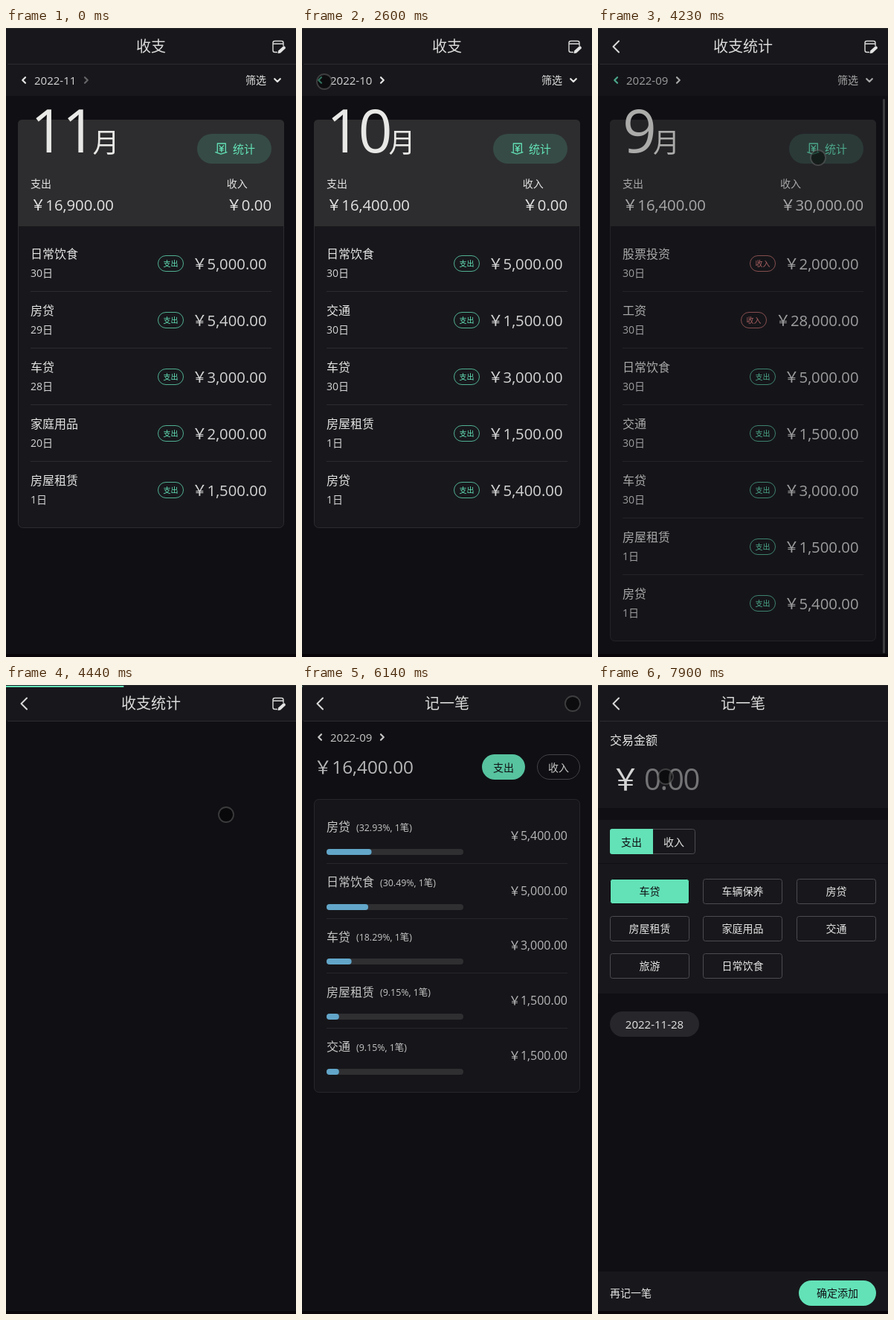
An HTML page that plays this animation: 390x844 px, repeating every 8 s.

```html
<!DOCTYPE html>
<html lang="zh-CN">
<head>
<meta charset="utf-8">
<title>收支</title>
<style>
html, body { margin: 0; width: 100%; height: 100%; overflow: hidden; background: #101014; }
svg { display: block; width: 390px; height: 844px; }
text { font-family: "Open Sans", "Noto Sans CJK SC", "Noto Sans CJK", sans-serif; white-space: pre; }
</style>
</head>
<body>
<svg id="stage" viewBox="0 0 390 844"></svg>
<script>
const LOOP = 8000;
const TEAL = '#63e2b7', RED = '#e88080', PANEL = '#18181c', LINE = '#2c2c30', EDGE = '#4c4c50';
const INK = '#e4e4e4', SOFT = '#d4d4d5', DARK = '#101014';

// Markup helpers; text is placed by the middle of its line.
const text = (x, cy, size, str, fill = INK, anchor = 'start', extra = '') =>
  `<text x="${x}" y="${cy + size * 0.37}" font-size="${size}" fill="${fill}" text-anchor="${anchor}" ${extra}>${str}</text>`;
const rect = (x, y, w, h, fill, r = 0, extra = '') =>
  `<rect x="${x}" y="${y}" width="${w}" height="${h}" rx="${r}" fill="${fill}" ${extra}/>`;
const box = (x, y, w, h, stroke, r, fill = 'none', extra = '') =>
  rect(x + 0.5, y + 0.5, w - 1, h - 1, fill, r, `stroke="${stroke}" ${extra}`);
const stroke = (d, color, width, extra = '') =>
  `<path d="${d}" fill="none" stroke="${color}" stroke-width="${width}" stroke-linecap="round" stroke-linejoin="round" ${extra}/>`;
const rule = (y, x1 = 33, x2 = 357) => rect(x1, y, x2 - x1, 1, LINE);
const group = (id, body) => `<g id="${id}">${body}</g>`;
const money = v => '￥' + v.toLocaleString('en-US', { minimumFractionDigits: 2, maximumFractionDigits: 2 });
const moneyWidth = (str, size) =>
  [...str].reduce((w, c) => w + (c === '￥' ? 1 : /\d/.test(c) ? 0.572 : 0.255), 0) * size;

const MONTHS = [
  { name: '11', out: 16900, inc: 0, rows: [
    ['日常饮食', 30, 5000], ['房贷', 29, 5400], ['车贷', 28, 3000], ['家庭用品', 20, 2000], ['房屋租赁', 1, 1500]] },
  { name: '10', out: 16400, inc: 0, rows: [
    ['日常饮食', 30, 5000], ['交通', 30, 1500], ['车贷', 30, 3000], ['房屋租赁', 1, 1500], ['房贷', 1, 5400]] },
  { name: '9', out: 16400, inc: 30000, rows: [
    ['股票投资', 30, 2000, 1], ['工资', 30, 28000, 1], ['日常饮食', 30, 5000], ['交通', 30, 1500],
    ['车贷', 30, 3000], ['房屋租赁', 1, 1500], ['房贷', 1, 5400]] }
];
const SPEND = [['房贷', 5400], ['日常饮食', 5000], ['车贷', 3000], ['房屋租赁', 1500], ['交通', 1500]];
const KINDS = ['车贷', '车辆保养', '房贷', '房屋租赁', '家庭用品', '交通', '旅游', '日常饮食'];

function listRow([name, day, sum, income], i, rows) {
  const y = 316 + i * 76, label = money(sum);
  const tagX = Math.round(339 - moneyWidth(label, 20.3)) - 35;
  const color = income ? RED : TEAL;
  return text(33, y - 13, 16, name) + text(33, y + 13, 14, day + '日', SOFT) +
    box(tagX, y - 11, 35, 22, color, 10.5, 'none', 'stroke-opacity=".75"') +
    text(tagX + 17.5, y, 10, income ? '收入' : '支出', color, 'middle') +
    text(350.5, y, 20.3, label, SOFT, 'end') +
    (i < rows.length - 1 ? rule(y + 37) : '');
}

function skeleton() {
  let s = '';
  for (let i = 0; i < 8; i++) s += rect(33, 278 + i * 40, i < 7 ? 324 : 194, i < 7 ? 32 : 30, '#353539', 3);
  return s;
}

const arrows = id =>
  stroke('M26 66.2L22.2 70L26 73.8', INK, 2.2, `id="${id}Prev"`) +
  stroke('M106 66.2L109.8 70L106 73.8', INK, 2.2, `id="${id}Next"`);

const ledgerPage = () =>
  rect(0, 49, 390, 42, PANEL) + arrows('nav') +
  group('navText', text(38, 70, 15, '', SOFT, 'start', 'id="date"') + text(322, 70, 14, '筛选') +
    stroke('M361.2 68.2L365 72L368.8 68.2', INK, 2.2)) +
  box(16, 123, 358, 548, LINE, 6, PANEL, 'id="card"') +
  `<path d="M16 266V129q0-6 6-6H368q6 0 6 6V266z" fill="#2d2d2f"/>` +
  `<text id="big" x="33" y="167" font-size="80" letter-spacing="-3" fill="#e8e8e6"></text>` +
  `<text id="unit" y="167" font-size="36" fill="#e8e8e6">月</text>` +
  rect(257, 142, 100, 40, TEAL, 20, 'fill-opacity=".16"') +
  stroke('M284.3 166V155h11v11M281.8 166.6L289 169.2L297 166.6M287 157.8l2.8 3.4l2.8-3.4M289.8 161.2v5M287.3 161.6h5M287.3 163.9h5', TEAL, 1.3) +
  text(305, 162, 15, '统计', TEAL) +
  text(33, 209, 14, '支出') + text(33, 237, 20.3, '', INK, 'start', 'id="out"') +
  text(297, 209, 14, '收入', INK, 'start', 'id="incLabel"') + text(357, 237, 20.3, '', INK, 'end', 'id="inc"') +
  group('skeleton', skeleton()) +
  MONTHS.map((m, i) => group('list' + i, m.rows.map(listRow).join(''))).join('');

function statsPage() {
  const total = SPEND.reduce((s, r) => s + r[1], 0);
  return arrows('stat') + text(38, 70, 15, '2022-09') +
    text(16, 110, 24.3, money(total), SOFT) +
    rect(242, 93, 58, 34, TEAL, 17) + text(271, 111, 14, '支出', DARK, 'middle') +
    box(316, 93, 58, 34, EDGE, 16.5) + text(345, 111, 14, '收入', INK, 'middle') +
    box(16, 153, 358, 394, LINE, 6, PANEL) +
    SPEND.map(([name, sum], i) => {
      const y = 190.5 + i * 73.7, part = sum / total;
      const bar = Math.round(y + 29.5);
      return text(33, y, 16, name) +
        text(41 + name.length * 16, y + 1, 12.4, `(${(part * 100).toFixed(2)}%, 1笔)`) +
        rect(33, bar, 184, 8, '#353538', 4) + rect(33, bar, 184 * part, 8, '#70c0e8', 4) +
        text(357, y + 11.5, 16, money(sum), SOFT, 'end') +
        (i < 4 ? rule(Math.round(y + 48.5)) : '');
    }).join('');
}

const recordPage = () =>
  rect(0, 49, 390, 116, PANEL) + rect(0, 181, 390, 58, PANEL) + rect(0, 240, 390, 174, PANEL) +
  rect(0, 787, 390, 53, PANEL) +
  text(16, 74, 16, '交易金额') + text(17, 126, 40, '￥', SOFT, 'start', 'font-weight="500"') +
  text(62, 126, 40, '0.00', '#747477', 'start', 'letter-spacing="-1.3"') +
  box(16, 193, 115, 34, EDGE, 3) +
  `<path d="M74 193V227H19q-3 0-3-3V196q0-3 3-3z" fill="${TEAL}"/>` +
  text(45, 211, 14, '支出', DARK, 'middle') + text(102, 211, 14, '收入', INK, 'middle') +
  KINDS.map((name, i) => {
    const x = Math.round(16 + i % 3 * 125.4), y = 260 + Math.floor(i / 3) * 50;
    return box(x, y, 107, 34, i ? EDGE : '#0c0c10', 3, i ? 'none' : TEAL) +
      text(x + 53.5, y + 17, 14, name, i ? INK : DARK, 'middle');
  }).join('') +
  rect(16, 438, 120, 34, '#27272b', 17) + text(76, 455, 15, '2022-11-28', INK, 'middle') +
  text(16, 816, 14, '再记一笔') +
  rect(270, 799, 104, 34, TEAL, 17) + text(322, 816, 14, '确定添加', DARK, 'middle');

const header = () =>
  rect(0, 0, 390, 48, PANEL) + rect(0, 0, 390, 1, '#28282b') + rect(2, 48, 388, 1, LINE) +
  text(195, 24.5, 20, '', '#dadada', 'middle', 'id="title"') +
  stroke('M28 17.5L20.5 25L28 32.5', '#dadada', 2, 'id="back"') +
  group('edit', stroke('M364.5 32.5H361.5q-2.5 0-2.5-2.5V20q0-2.5 2.5-2.5H370.5q2.5 0 2.5 2.5V23.5M359 21.2H373', '#dadada', 1.4) +
    '<path d="M365.6 34.2l.6-3.6l6.6-6q1.2-.8 2.4.4t.4 2.4l-6.4 6.2z" fill="#e4e4e4"/>');

document.getElementById('stage').innerHTML =
  rect(0, 0, 390, 844, DARK) +
  group('ledger', ledgerPage()) + group('stats', statsPage()) + group('record', recordPage()) +
  rect(383, 95, 3, 744, '#3c3c3f', 1.5, 'id="thumb"') +
  rect(0, 840, 390, 4, '#090508') + header() +
  rect(0, 1, 0, 2, TEAL, 0, 'id="bar"') +
  group('status', '<path d="M0 824H124q4 0 4 4V844H0z" fill="#292a2d"/>' +
    text(5, 834.5, 12, '正在等待 placid-el...', '#f0f0f0')) +
  '<circle id="touch" r="10" fill="#000" fill-opacity=".5" stroke="#6a6a6a" stroke-opacity=".5" stroke-width="1.8"/>';

const el = {};
document.querySelectorAll('[id]').forEach(n => el[n.id] = n);
const set = (id, attrs) => { for (const k in attrs) el[id].setAttribute(k, attrs[k]); };
const show = (id, on) => { el[id].style.display = on ? '' : 'none'; };
const fade = (id, o) => { show(id, o > 0); el[id].setAttribute('opacity', o); };
const ramp = (t, a, b) => Math.min(1, Math.max(0, (t - a) / (b - a)));
const smooth = k => k * k * (3 - 2 * k);

// time, x, y, and whether the move into this point is eased
const PATH = [
  [200, 357, 389], [1000, 34, 72], [1080, 30, 72], [3500, 30, 72], [4080, 296, 174, 1], [5000, 296, 174],
  [5110, 320, 131], [5450, 350, 66], [5900, 364, 25], [6600, 364, 25], [6810, 300, 62],
  [7630, 94, 72], [7850, 91, 123]
];
function touchAt(t) {
  const i = PATH.findIndex(p => p[0] > t);
  if (i < 0) return PATH[PATH.length - 1].slice(1, 3);
  const a = PATH[Math.max(0, i - 1)], b = PATH[i];
  const k = ramp(t, a[0], b[0]), e = b[3] ? smooth(k) : k;
  return [a[1] + (b[1] - a[1]) * e, a[2] + (b[2] - a[2]) * e];
}

const CLICKS = [1350, 2740], WAIT = 234.8, COUNT = 500;

function drawLedger(t) {
  const m = CLICKS.filter(c => t >= c).length;
  const since = m ? t - CLICKS[m - 1] - WAIT : COUNT;
  const loading = since < 0;
  const shown = MONTHS[loading ? m - 1 : m];
  const k = loading ? 1 : 1 - (1 - ramp(since, 0, COUNT)) ** 5;
  const { name, rows } = MONTHS[m];

  el.date.textContent = '2022-' + name.padStart(2, '0');
  el.big.textContent = name;
  set('unit', { x: 31.5 + 42.5 * name.length });
  el.out.textContent = money(shown.out * k);
  el.inc.textContent = money(shown.inc * k);
  set('incLabel', { x: 357 - moneyWidth(el.inc.textContent, 20.3) });
  set('card', { height: (loading ? 601 : 291 + 76 * rows.length) - 124 });
  show('skeleton', loading);
  MONTHS.forEach((_, i) => show('list' + i, i === m && !loading));

  const dim = CLICKS.reduce((d, c) => d + ramp(t, c + 130, c + 260) - ramp(t, c + 335, c + 560), 0);
  set('navText', { opacity: 1 - dim / 2 });
  set('navPrev', { stroke: t > 1080 ? TEAL : INK, opacity: 1 - dim / 2 });
  set('navNext', { opacity: 0.38 + 0.62 * ramp(t, 1480, 1800) });
  show('thumb', m === 2 && !loading && t < 4430);
}

function draw(t) {
  drawLedger(t);
  fade('ledger', 1 - ramp(t, 4150, 4436));
  fade('stats', ramp(t, 4480, 4800) * (1 - ramp(t, 6100, 6380)));
  fade('record', ramp(t, 6725, 7030));

  el.title.textContent = t < 4150 ? '收支' : t < 6100 ? '收支统计' : '记一笔';
  show('back', t >= 4150);
  show('edit', t < 6100);

  const second = t >= 6100;
  const grow = second ? ramp(t, 6130, 6700) : ramp(t, 4240, 4700);
  set('bar', { width: 390 * smooth(grow) });
  fade('bar', second ? 1 - ramp(t, 6760, 7100) : 1 - ramp(t, 4700, 5040));
  show('status', t >= 6500 && t < 7250);

  const [cx, cy] = touchAt(t);
  set('touch', { cx, cy });
  show('touch', t >= 200);
}

const start = performance.now();
function tick() {
  draw((performance.now() - start) % LOOP);
  requestAnimationFrame(tick);
}
tick();
</script>
</body>
</html>
```
